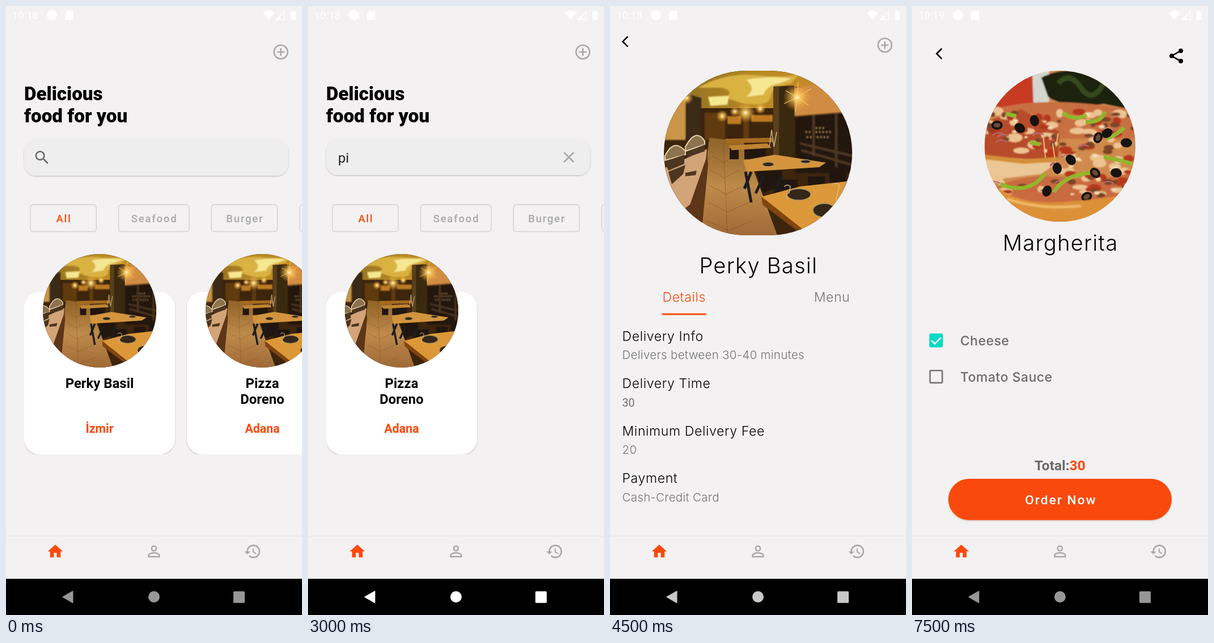
These frames come from a looping animation (522 by 1073 pixels, 8 s). An HTML page:

```html
<!DOCTYPE html>
<html lang="en">
<head>
<meta charset="utf-8">
<title>Food ordering app</title>
<style>
  html, body { margin: 0; width: 100%; height: 100%; overflow: hidden; background: #f3f1f2; }
  svg { display: block; }
  #stage { width: 100vw; height: 100vh; }
  text { font-family: Roboto, sans-serif; white-space: pre; }
  .heading { font-size: 33.2px; font-weight: 800; }
  .clock { font-size: 18.6px; fill: #fff; }
  .chip { font-size: 18.7px; font-weight: 500; letter-spacing: 1.7px; }
  .name { font-size: 23.9px; font-weight: 700; }
  .city { font-size: 21.3px; font-weight: 700; fill: #fa4a0c; }
  .query { font-size: 23.9px; fill: #222; }
  .title, .tab, .label, .value, .option { font-family: Inter, sans-serif; }
  .title { font-size: 38px; font-weight: 350; letter-spacing: 1.3px; }
  .tab { font-size: 23px; font-weight: 350; letter-spacing: .6px; }
  .label { font-size: 23px; font-weight: 350; letter-spacing: .65px; }
  .value { font-size: 20.5px; font-weight: 350; letter-spacing: .3px; fill: #747474; }
  .number { font-size: 19.8px; fill: #707070; }
  .option { font-size: 23px; font-weight: 450; letter-spacing: .5px; fill: #6b6b6b; }
  .item { font-size: 22.6px; }
  .price { font-size: 19.9px; fill: #fa4a0c; }
  .total { font-size: 24.6px; font-weight: 700; fill: #6a6a6a; }
  .order { font-size: 22.8px; font-weight: 500; letter-spacing: 2px; fill: #fff; }
  .mid { text-anchor: middle; }
  .end { text-anchor: end; }
</style>
</head>
<body>
<svg id="stage" viewBox="0 0 522 1073">
  <defs>
    <filter id="shadow" x="-10%" y="-20%" width="120%" height="140%">
      <feDropShadow dx="0" dy="1.2" stdDeviation="1.1" flood-opacity=".22"/>
    </filter>
    <filter id="soft"><feGaussianBlur stdDeviation="1.2"/></filter>
    <radialGradient id="glow">
      <stop offset="0" stop-color="#fffbe0"/><stop offset=".2" stop-color="#ffd36a" stop-opacity=".9"/>
      <stop offset="1" stop-color="#f0a030" stop-opacity="0"/>
    </radialGradient>
    <linearGradient id="floor" x2="0" y2="1">
      <stop offset="0" stop-color="#8f6226"/><stop offset=".5" stop-color="#bd8a4a"/><stop offset="1" stop-color="#a06a38"/>
    </linearGradient>
    <linearGradient id="ceiling" x2="1">
      <stop offset="0" stop-color="#8a6a24"/><stop offset=".5" stop-color="#b98a22"/><stop offset="1" stop-color="#cf8a2c"/>
    </linearGradient>
    <clipPath id="chipArea"><path d="M32 340H522V410H32z"/></clipPath>
    <clipPath id="cardArea"><path d="M32 430H522V790H32z"/></clipPath>

    <symbol id="restaurant" viewBox="0 0 332 290" preserveAspectRatio="xMidYMid slice">
      <rect width="332" height="290" fill="#3c240d"/>
      <path d="M0 0H332V32L232 28 195 66H68L0 60z" fill="url(#ceiling)"/>
      <g filter="url(#soft)">
        <path d="M60 30Q110 2 165 8T240 4L225 22Q190 28 188 46T140 58L110 48Q125 34 100 30z" fill="#d9b243"/>
        <path d="M145 16Q190 8 225 14L205 22Q180 26 176 42L145 46Q165 32 145 16zM78 46L115 44 112 60 82 62z" fill="#f6e793"/>
        <path d="M0 58L38 46V122H0z" fill="#c99546"/>
        <path d="M38 40L66 48V118H38z" fill="#3a2a18"/>
        <path d="M72 74H108V122H72zM140 78H150V120H140z" fill="#5e3b10"/>
        <path d="M154 78H192V90H154zM112 80H136V94H112z" fill="#bd7a24"/>
        <path d="M230 30L332 14V72L230 80z" fill="#d08c42"/>
        <path d="M232 82L332 74V180H232z" fill="#23160d"/>
        <path d="M250 108h48M252 117h38M262 101h22" stroke="#ad8558" stroke-width="3" stroke-dasharray="2 4"/>
        <path d="M240 128L332 150M242 140L332 166M264 78V150M304 74V170" stroke="#4f3822" stroke-width="4"/>
      </g>
      <path d="M80 118L140 125 200 290H60z" fill="url(#floor)"/>
      <path d="M85 150l20 12 20-12M82 175l25 14 26-14M80 202l30 16 32-16M78 232l34 17 38-17M74 264l40 18 42-18M105 125L112 290"
        fill="none" stroke="#6d421b" stroke-opacity=".45"/>
      <path d="M193 28L230 26V158L193 156z" fill="#39290f"/><path d="M193 28L203 27V157H193z" fill="#59401c"/>
      <path d="M0 172L76 140 78 166 66 290H0z" fill="#5d3518"/>
      <path d="M0 172L76 138 74 156 46 236 24 252 0 216z" fill="#d3a478"/>
      <g fill="#8d7250" stroke="#e6d2aa" stroke-width="2">
        <path d="M2 150q16-32 36-8v6L2 158zM38 134q18-34 34-10v6L38 142z"/>
      </g>
      <path d="M2 160L36 148v16L8 176zM40 144L72 130v12L42 152zM8 178L38 166 34 182 14 200zM38 180l20-4-2 8-18 2z" fill="#4c3520"/>
      <path d="M116 136h16v20h-16zM142 134h38v22h-38zM162 176h46v26l-34 14zM194 192h42v24h-42zM254 186h30v20h-30zM292 178h30v26h-30z" fill="#21160f"/>
      <path d="M108 120L192 118V126L112 128z" fill="#a66a1f"/><path d="M114 132L182 128 190 136 120 140z" fill="#c08330"/>
      <path d="M140 158L196 148 286 162 274 170 146 178z" fill="#d3943d"/>
      <path d="M144 178L154 232M154 178L142 208M162 216l14-30M196 214l12-30" stroke="#1c1c20" stroke-width="5"/>
      <path d="M172 222L240 204 332 194V290H258z" fill="#dc9838"/>
      <path d="M172 222L258 290H246L174 236z" fill="#81440f"/>
      <g fill="#34271a" stroke="#a79468" stroke-width="1.3">
        <ellipse cx="238" cy="218" rx="21" ry="10"/><ellipse cx="283" cy="246" rx="20" ry="12"/>
        <ellipse cx="184" cy="165" rx="10" ry="4"/><ellipse cx="250" cy="160" rx="9" ry="3"/>
      </g>
      <path d="M212 204q6-5 11 0l-2 11-4 2v10M298 200q7-4 12 2l-4 14-3 14M186 134l4-30 4 30 5-26" fill="none" stroke="#d6bc8e" stroke-width="1.4"/>
      <path d="M235 47l24-15M235 47l-23 11M235 47l2-27M235 47l-3 25M235 47l20 14M235 47l-20-12" stroke="#ffc65c" stroke-width="1.2"/>
      <g fill="url(#glow)">
        <circle cx="235" cy="47" r="25"/><circle cx="144" cy="74" r="18"/><circle cx="40" cy="48" r="12"/>
        <circle cx="170" cy="67" r="10"/><circle cx="103" cy="80" r="11"/><circle cx="125" cy="72" r="9"/>
      </g>
    </symbol>

    <symbol id="pizza" viewBox="0 0 266 266" preserveAspectRatio="xMidYMid slice">
      <rect width="266" height="266" fill="#cf8a4c"/>
      <g filter="url(#soft)">
        <path d="M0 0H115V70H0z" fill="#c73a20"/><path d="M84 0h30v56H86z" fill="#d5d6ce"/>
        <path d="M100 12Q140-10 266 0V70L210 58Q150 70 112 46z" fill="#1b2210"/>
        <path d="M130 22q20-22 40 8t40-8" fill="none" stroke="#344a1c" stroke-width="9"/>
        <path d="M30 64Q120 44 266 70V120H50z" fill="#c96f42"/>
        <path d="M0 90L65 68 132 108 130 156 0 156z" fill="#b74c29"/>
        <path d="M0 154L60 156 128 162 100 182 0 194z" fill="#ecc796"/>
        <path d="M20 206Q70 180 140 188T266 176V266H20z" fill="#c96a3f"/>
      </g>
      <g id="toppings"></g>
      <g filter="url(#soft)">
        <path d="M0 152L70 160 130 156" stroke="#d58f38" stroke-width="8" fill="none"/>
        <path d="M24 206Q60 234 120 232T266 216V266H24z" fill="#dc9038"/>
        <path d="M40 226Q100 246 170 238" stroke="#f0b968" stroke-width="5" fill="none"/>
      </g>
    </symbol>
  </defs>
  <g id="screen"></g>
</svg>
<script>
const ORANGE = '#fa4a0c', GREY = '#a9a9a9', UNIT = 1.329;
const RESTAURANT = 'Perky Basil', PIZZERIA = ['Pizza', 'Doreno'];

const text = (kind, x, y, words, fill) =>
  `<text class="${kind}" x="${x}" y="${y}"${fill ? ` fill="${fill}"` : ''}>${words}</text>`;
const box = (x, y, w, h, r, style) =>
  `<rect x="${x}" y="${y}" width="${w}" height="${h}" rx="${r}" ${style}/>`;
const line = (d, color, width) =>
  `<path d="${d}" fill="none" stroke="${color}" stroke-width="${width}"/>`;
const icon = (d, x, y, fill) =>
  `<path d="${d}" transform="translate(${x} ${y}) scale(${UNIT})" fill="${fill}"/>`;
const photo = (id, x, y, w, h) => {
  const clip = `${id}-${x}-${y}`;
  return `<clipPath id="${clip}">${box(x, y, w, h, Math.min(w, h) / 2, '')}</clipPath>
    <g clip-path="url(#${clip})"><use href="#${id}" x="${x}" y="${y}" width="${w}" height="${h}"/></g>`;
};
const RAISED = 'filter="url(#shadow)"';

const ICONS = {
  home: 'M10 20v-6h4v6h5v-8h3L12 3 2 12h3v8z',
  person: 'M12 5.9a2.1 2.1 0 1 1 0 4.2 2.1 2.1 0 0 1 0-4.2m0 9c2.97 0 6.1 1.46 6.1 2.1v1.1H5.9V17c0-.64 3.13-2.1 6.1-2.1M12 4C9.79 4 8 5.79 8 8s1.79 4 4 4 4-1.79 4-4-1.79-4-4-4zm0 9c-2.67 0-8 1.34-8 4v3h16v-3c0-2.66-5.33-4-8-4z',
  history: 'M13 3c-4.97 0-9 4.03-9 9H1l3.89 3.89.07.14L9 12H6c0-3.87 3.13-7 7-7s7 3.13 7 7-3.13 7-7 7c-1.93 0-3.68-.79-4.94-2.06l-1.42 1.42C8.27 19.99 10.51 21 13 21c4.97 0 9-4.03 9-9s-4.03-9-9-9zm-1 5v5l4.28 2.54.72-1.21-3.5-2.08V8H12z',
  search: 'M15.5 14h-.79l-.28-.27A6.47 6.47 0 0 0 16 9.5 6.5 6.5 0 1 0 9.5 16c1.61 0 3.09-.59 4.23-1.57l.27.28v.79l5 4.99L20.49 19l-4.99-5zm-6 0C7.01 14 5 11.99 5 9.5S7.01 5 9.5 5 14 7.01 14 9.5 11.99 14 9.5 14z',
};

const addButton = y =>
  `<circle cx="484.7" cy="${y}" r="12" fill="none" stroke="${GREY}" stroke-width="2.6"/>` +
  line(`M478 ${y}h13.4M484.7 ${y - 6.7}v13.4`, GREY, 2.6);
const backButton = (x, y) => line(`M${x + 4.5} ${y - 9}l-9 9 9 9`, '#000', 2.6);

function chrome(clock, navColor) {
  return text('clock', 11, 23, clock) +
    `<g fill="#fff"><circle cx="81" cy="16" r="9"/>
      <path d="M109 8h8q1.5 0 1.5 1.5v14q0 1.5-1.5 1.5h-11.5q-1.5 0-1.5-1.5V13z"/>
      <path d="M453 12q10-8 20 0l-10 12.5z"/><path d="M484 16v8.5h-8.5z"/>
      <path d="M502 10h2.5V8h4v2h2.5v15h-9z"/></g>` +
    line('M476.5 24L491 9.5V24z', '#fff', 1.3) +
    line('M0 934H522', '#e9e7e8', 1.6) +
    icon(ICONS.home, 71, 945, ORANGE) + icon(ICONS.person, 245, 945, GREY) + icon(ICONS.history, 419, 945, GREY) +
    '<path d="M0 1009.2H522V1073H0z"/>' +
    `<g fill="${navColor}"><path d="M117.5 1030.5q1-.3 1 1v19.5q0 1.3-1 1l-17.5-10q-1-.7 0-1.4z"/>
      <circle cx="261" cy="1041" r="10"/>${box(401, 1031.3, 20, 20.5, 1.5, '')}</g>`;
}

// Each chip is [left, width, label, selected].
const chip = ([x, w, label, selected]) =>
  box(x, 350, w, 47.5, 5, 'fill="none" stroke="#d2d1d1" stroke-width="1.4"') +
  text('chip mid', x + w / 2 + .8, 381, label, selected ? ORANGE : GREY);
const ALL_CHIPS = [[43, 116.3, 'All', true], [198.5, 124.5, 'Seafood'], [362.3, 116.3, 'Burger'], [518, 117, '']];
const PIZZA_CHIPS = [[-31, 117, ''], [125, 116.5, 'Bakery'], [280.8, 116.3, 'Pizza', true], [436.3, 120, 'Dessert']];

const card = (x, name, city) =>
  `<g clip-path="url(#cardArea)">${box(x, 503.5, 266, 286.5, 27, `fill="#fff" ${RAISED}`)}</g>` +
  photo('restaurant', x + 33, 437, 200, 200) +
  name.map((row, i) => text('name mid', x + 133, 673 + 28 * i, row)).join('') +
  text('city mid', x + 133, 752, city);

function home(chips, cards, query) {
  const field = query
    ? text('query', 53, 276, query) + line('M451.5 258l17 17m0-17l-17 17', GREY, 2.5)
    : icon(ICONS.search, 47.5, 251, '#6c6c6c');
  const cutLabel = chips === PIZZA_CHIPS ? text('chip end', 65.5, 381, 'Salad', GREY) : '';
  return addButton(81) + text('heading', 32, 166, 'Delicious') + text('heading', 32, 205, 'food for you') +
    box(32, 235.5, 466, query ? 62.5 : 63.5, 21, `fill="#eee" ${RAISED}`) + field +
    `<g clip-path="url(#chipArea)">${chips.map(chip).join('')}${cutLabel}</g>` + cards;
}

function restaurantHeader(y, menuOpen) {
  const tab = (x, label, open) => text('tab mid', x, y + 50.3, label, open ? ORANGE : '#747474');
  return backButton(27, 62.7) + addButton(69) + text('title mid', 261.8, y, RESTAURANT) +
    tab(130.7, 'Details', !menuOpen) + tab(391.5, 'Menu', menuOpen) +
    line(menuOpen ? `M358.5 ${y + 72}h66` : `M91.5 ${y + 72}h78`, ORANGE, 2.8);
}

const details = () => photo('restaurant', 95, 114, 332, 290) + restaurantHeader(471, false) +
  [['Delivery Info', 'Delivers between 30-40 minutes'], ['Delivery Time', '30'],
   ['Minimum Delivery Fee', '20'], ['Payment', 'Cash-Credit Card']].map(([label, value], i) =>
    text('label', 21.5, 589.5 + 83.5 * i, label) +
    text(i === 1 ? 'number' : 'value', 21.5, 622.3 + 83.5 * i, value)).join('');

const menu = () => restaurantHeader(138.3, true) +
  box(10.5, 227.5, 501, 101, 27, `fill="#fff" ${RAISED}`) + photo('pizza', 21, 238, 80, 80) +
  text('item', 122.3, 265.5, 'Margherita') + text('price', 441, 286.5, '30 $');

const order = () => backButton(48, 84) +
  line('M474 78.6L458 88l16 9.4', '#000', 2.6) +
  [[474, 79], [458, 88], [474, 97]].map(([x, y]) => `<circle cx="${x}" cy="${y}" r="4"/>`).join('') +
  photo('pizza', 128, 114, 266, 266) + text('title mid', 261.8, 430.5, 'Margherita') +
  box(30.5, 577, 24, 24.5, 3, 'fill="#03dac5"') + line('M34.5 589.5l5.7 5.7 11-11', '#fff', 2.6) +
  box(31.8, 642.3, 21.6, 21.6, 2, 'fill="none" stroke="#757575" stroke-width="2.6"') +
  text('option', 85, 598, 'Cheese') + text('option', 85, 662, 'Tomato Sauce') +
  text('total mid', 261, 818, `Total:<tspan fill="${ORANGE}">30</tspan>`) +
  box(64, 833, 394, 72.7, 36.4, `fill="${ORANGE}" ${RAISED}`) + text('order mid', 262.5, 878, 'Order Now');

function toppings() {
  let seed = 7;
  const random = () => (seed = seed * 16807 % 2147483647) / 2147483647;
  const scatter = (count, draw) => Array.from({ length: count }, () => {
    const x = random() * 266, y = 70 + random() * 155;
    return x < 110 && y > 142 && y < 188 ? '' : draw(x, y);
  }).join('');
  const blob = (color, size) => (x, y) =>
    `<ellipse cx="${x}" cy="${y}" rx="${size * (.6 + random())}" ry="${size * (.4 + random() * .5)}" fill="${color}"/>`;
  const olives = [[22, 96], [62, 101], [88, 88], [200, 118], [216, 110], [250, 127], [195, 180],
    [128, 172], [110, 212], [180, 222], [232, 180], [152, 157]];
  return '<g filter="url(#soft)">' + scatter(60, blob('#edc392', 9)) + scatter(34, blob('#b5381f', 8)) +
    scatter(34, blob('#7b4528', 6)) + scatter(26, blob('#f6dcb4', 4)) + '</g>' +
    scatter(14, (x, y) => line(`M${x} ${y}q8-9 20-2`, '#b86a75', 2)) +
    ['M28 200q50 20 78-18', 'M122 214q18-30 64-34', 'M138 74q20 16 42 4', 'M178 90q28 2 34-18', 'M214 120q22-8 32-20',
     'M38 76l18 4', 'M210 152q24 4 50 12', 'M80 126l18 4'].map(d => line(d, '#93b52c', 7)).join('') +
    olives.map(([x, y], i) =>
      `<ellipse cx="${x}" cy="${y}" rx="8" ry="6" transform="rotate(${i * 37} ${x} ${y})" fill="${i % 3 ? '#17130f' : '#6b4b34'}" stroke="#17130f" stroke-width="4"/>`).join('') +
    line('M104 120l4 40M120 128l5 34M130 110l-4 24', '#efbd70', 2);
}
document.getElementById('toppings').innerHTML = toppings();

const pizzeria = x => card(x, PIZZERIA, 'Adana');
const screens = [
  home(ALL_CHIPS, card(32, [RESTAURANT], 'İzmir') + pizzeria(319)) + chrome('10:18', '#979797'),
  home(PIZZA_CHIPS, pizzeria(32)) + chrome('10:20', '#979797'),
  home(ALL_CHIPS, pizzeria(32), 'pi') + chrome('10:18', '#fff'),
  details() + chrome('10:18', '#c8c8c8'),
  menu() + chrome('10:18', '#979797'),
  order() + chrome('10:19', '#979797'),
];

const LOOP = 8000, HOLD = 1500;
const screen = document.getElementById('screen');
const start = performance.now();
let shown = -1;
function tick() {
  const current = Math.floor((performance.now() - start) % LOOP / HOLD);
  if (current !== shown) screen.innerHTML = screens[shown = current];
  requestAnimationFrame(tick);
}
tick();
</script>
</body>
</html>
```
